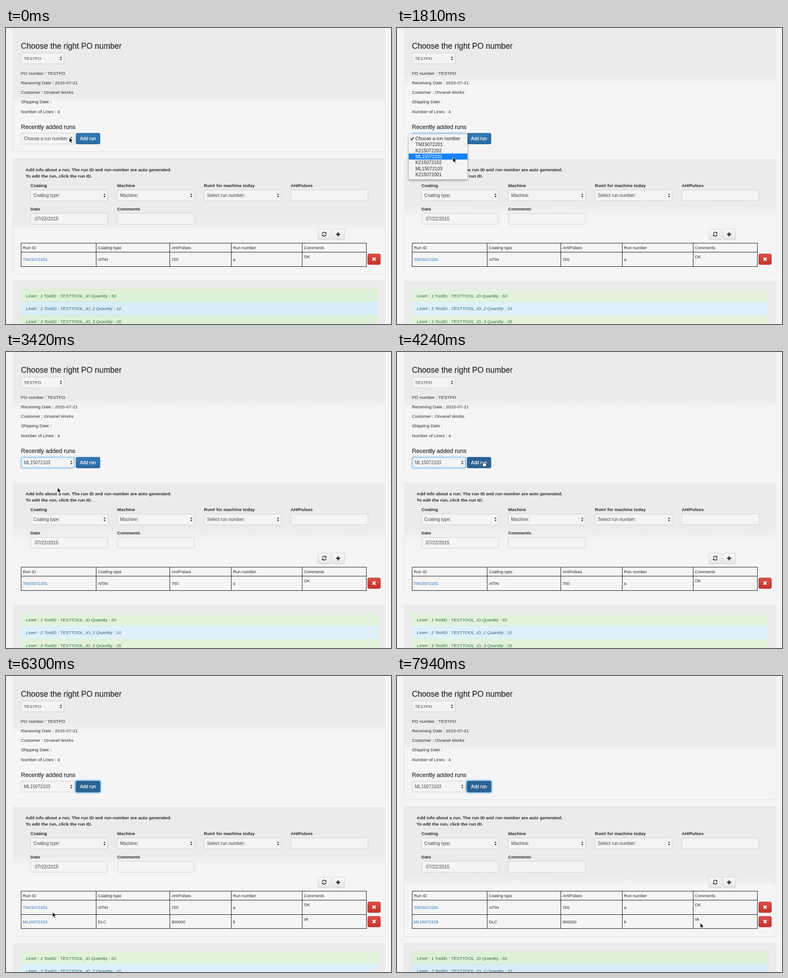
These frames come from a looping animation (852 by 657 pixels, 8000 ms). An HTML page:

```html
<!DOCTYPE html>
<html lang="en">
<head>
<meta charset="utf-8">
<title>Add run to order</title>
<style>
  html, body { margin: 0; width: 100%; height: 100%; overflow: hidden; background: #f5f5f5; }
  svg { display: block; width: 852px; height: 657px; font-family: "Liberation Sans", Arial, sans-serif; font-size: 9.9px; fill: #2a2a2a; }
  text { white-space: pre; }
  .head { fill: #333; stroke: #333; stroke-width: .3px; }
  .bold { font-weight: bold; }
  .cell { font-size: 9.3px; }
  .link { fill: #2a6fb5; }
  .field { fill: #f4f4f4; stroke: #cfcfcf; }
  .value { fill: #444; font-size: 10px; }
  .grid { fill: none; stroke: #111; }
  .focus { fill: none; stroke: #66afe9; filter: drop-shadow(0 0 2px #66afe9); }
  .menu { fill: #f3f3f3; filter: drop-shadow(0 2px 2.5px rgba(0,0,0,.4)); }
  .item { font-size: 10.25px; }
  .icon { fill: none; stroke: #222; }
  .line { font-size: 9.72px; }
  .it { font-style: italic; }
</style>
</head>
<body>
<script>
const LOOP = 8000, ROW = 32;

function add(parent, tag, attrs = {}, text) {
  const node = document.createElementNS("http://www.w3.org/2000/svg", tag);
  for (const k in attrs) node.setAttribute(k, attrs[k]);
  if (text !== undefined) node.textContent = text;
  parent.appendChild(node);
  return node;
}
const svg = add(document.body, "svg", { viewBox: "0 0 852 657" });
const defs = add(svg, "defs");
const group = (parent = svg) => add(parent, "g");
const box = (parent, x, y, w, h, attrs) => add(parent, "rect", { x, y, width: w, height: h, ...attrs });
const label = (parent, x, y, str, cls = "", attrs = {}) => add(parent, "text", { x, y, class: cls, ...attrs }, str);
const show = (node, on) => node.setAttribute("visibility", on ? "visible" : "hidden");

function gradient(id, top, bottom, attrs = {}) {
  const g = add(defs, "linearGradient", { id, x1: 0, y1: 0, x2: 0, y2: 1, ...attrs });
  add(g, "stop", { offset: 0, "stop-color": top });
  add(g, "stop", { offset: 1, "stop-color": bottom });
  return g;
}
const user = { gradientUnits: "userSpaceOnUse" };
const shades = [gradient("shade0", "#ebebeb", "#f5f5f5", user), gradient("shade1", "#ebebeb", "#f5f5f5", user)];
gradient("blue", "#337ab7", "#2b69a0");
gradient("red", "#da514d", "#c4322e");
gradient("grey", "#fcfcfc", "#e4e4e4");

const panel = (parent, y, h, fill) =>
  box(parent, 15.5, y, 823.5, h, { rx: 3, fill, stroke: "#e0e0e0" });

function select(x, y, w, value) {
  box(svg, x, y, w, 24, { rx: 2.5, class: "field" });
  const cx = x + w - 7, cy = y + 12;
  add(svg, "path", { d: `M${cx - 2.3} ${cy - 1.2}h4.6l-2.3 -3.4zM${cx - 2.3} ${cy + 1.2}h4.6l-2.3 3.4z`, fill: "#333" });
  return label(svg, x + 6, y + 15.6, value, "value");
}
const input = (x, y) => box(svg, x, y, 170.5, 24, { rx: 2.5, class: "field" });

// Order summary
const panels = [panel(svg, -8.5, 283, "url(#shade0)"), panel(svg, 290.5, 256, "url(#shade1)")];
label(svg, 33, 46, "Choose the right PO number", "head", { "font-size": 17.5 });
select(33.5, 55.5, 95, "TESTPO").style.fontSize = "9.6px";
["PO number : TESTPO", "Receiving Date : 2015-07-21", "Customer : Orvanel Works", "Shipping Date :", "Number of Lines : 4"]
  .forEach((s, i) => label(svg, 33, 104 + i * 21.15, s));
label(svg, 33, 224.4, "Recently added runs", "head", { "font-size": 13.15 });
const runValue = select(33.5, 233.5, 118, "Choose a run number");
const runFocus = box(svg, 33.5, 233.5, 118, 24, { rx: 2.5, class: "focus" });
const addFocus = box(svg, 154.5, 233, 54, 25, { rx: 3, class: "focus", "stroke-width": 2.5 });
const addButton = box(svg, 155, 233.5, 53, 24, { rx: 3, stroke: "#2b669a" });
label(svg, 163.8, 249.2, "Add run", "", { fill: "#fff", stroke: "#fff", "stroke-width": .25, "font-size": 10 });

// Run form
label(svg, 43.5, 317.6, "Add info about a run. The run ID and run number are auto generated.", "bold");
label(svg, 43.5, 331.6, "To edit the run, click the run ID.", "bold");
const cols = [54.5, 246.5, 438.5, 630.5];
["Coating", "Machine", "Run# for machine today", "AH/Pulses"].forEach((s, i) => label(svg, cols[i] - .5, 352.6, s, "bold"));
["Coating type:", "Machine:", "Select run number:"].forEach((s, i) => select(cols[i], 359.5, 170.5, s));
input(cols[3], 359.5);
["Date", "Comments"].forEach((s, i) => {
  label(svg, cols[i] - .5, 404.6, s, "bold");
  input(cols[i], 411.5);
});
label(svg, 64, 427.2, "07/22/2015", "value", { style: "font-size:10.4px" });

for (const x of [690, 721]) box(svg, x + .5, 446.5, 27.5, 23.5, { rx: 3, fill: "url(#grey)", stroke: "#ccc" });
add(svg, "path", { d: "M700 456.5a4.2 4.2 0 0 1 7.3 -2M708.4 458.5a4.2 4.2 0 0 1 -7.3 2", class: "icon", "stroke-width": 1.5 });
add(svg, "path", { d: "M708.9 452.4v4h-4zM699.5 462.6v-4h4z" });
add(svg, "path", { d: "M730.4 458h9.2M735 453.4v9.2", class: "icon", "stroke-width": 2.6 });

// Run table
const edges = [33.5, 199.5, 362.5, 498.5, 655.5, 797.5];
function tableRow(parent, y, h, cells, header) {
  cells.forEach((s, i) => {
    box(parent, edges[i], y, edges[i + 1] - edges[i], h, { class: "grid" });
    const base = header ? 13.2 : i === 4 ? 13.4 : 19;
    label(parent, edges[i] + 3.7, y + base, s, header || i ? "cell" : "cell link");
  });
  if (header) return;
  box(parent, 800.5, y + 4, 28, 23.5, { rx: 3, fill: "url(#red)", stroke: "#bb3430" });
  add(parent, "path", { d: `M811.2 ${y + 12.2}l6.6 6.6m0 -6.6l-6.6 6.6`, stroke: "#fff", "stroke-width": 2.5 });
}
tableRow(svg, 477.5, 20, ["Run ID", "Coating type", "AH/Pulses", "Run number", "Comments"], true);
tableRow(svg, 497.5, ROW, ["TM15072201", "AlTiN", "750", "a", "OK"]);
const newRow = group();
tableRow(newRow, 497.5 + ROW, ROW - 1, ["ML15072103", "DLC", "900000", "b", "ok"]);

// Order lines
const lines = group();
panels.push(panel(lines, 561.5, 140, "#ebebeb"));
const green = { fill: "#dff0d8", pale: "#e2f2dc", edge: "#d3e6c5", ink: "#33693a" };
const sky = { fill: "#d9edf7", pale: "#def0f9", edge: "#c6e4ee", ink: "#2b6080" };
const bars = [green, sky, green].map((tint, i) => {
  const y = 579.5 + i * 28.8;
  const rect = box(lines, 33.5, y, 788, 28.8, { "stroke-width": .7 });
  const row = label(lines, 44, y + 18, "", "line", { fill: tint.ink });
  const id = "TESTTOOL_ID" + (i ? "_" + (i + 1) : "");
  ["Line# : ", i + 1, " ToolID : ", id, " Quantity : ", [50, 10, 25][i]]
    .forEach((s, k) => add(row, "tspan", { class: i || k % 2 ? "it" : "" }, s));
  return { rect, tint };
});

// Open run menu
const menu = group();
const PITCH = 13.35, MENU_TOP = 238.6;
add(menu, "path", { d: "M26 236H156V333q0 3 -3 3H29q-3 0 -3 -3z", class: "menu" });
const mark = box(menu, 26, 0, 130, 13.4, { fill: "#1682fc" });
const items = ["Choose a run number", "TM15072201", "K215072202", "ML15072101", "K215072102", "ML15072103", "K215072001"]
  .map((s, i) => label(menu, 40.7, 249 + i * PITCH, s, "item"));
const tick = add(menu, "path", { d: "M30.3 245.8l2.3 3l4 -6.6", fill: "none", "stroke-width": 1.5 });

// Pointer
const arrow = add(svg, "path", {
  d: "M0 0V11.2L2.6 8.8L4.4 12.8L6.4 11.9L4.6 8H8.2Z", fill: "#000", stroke: "#fff", "stroke-width": .9 });
const hand = add(svg, "path", {
  d: "M3 7.5V1.6Q3 .6 4 .6T5 1.6V4.6Q7 4 7.4 5Q9 4.6 9.2 5.6Q10.8 5.4 10.8 7V9L9.8 12.4H4.4L1 8Q.4 6.8 1.4 6.4Z",
  fill: "#fff", stroke: "#000", "stroke-width": .9 });

// [start, end, steps, x, y, curved]
const moves = [
  [1040, 1040, 1, 139, 243],
  [1340, 1890, 10, 123, 298, 1],
  [2100, 2360, 5, 117, 310],
  [3120, 3120, 1, 115, 306],
  [3330, 3400, 2, 114, 301],
  [3460, 4130, 12, 184, 242],
  [4180, 4240, 2, 187, 242],
  [5370, 5370, 1, 183, 244],
  [5510, 5800, 6, 116, 487, 1],
  [6070, 6300, 5, 103, 524],
  [6360, 6580, 5, 120, 542],
  [7030, 7820, 13, 657, 549],
  [7880, 7940, 2, 671, 548]
];
function pointer(t) {
  let x = 140, y = 243;
  for (const [t0, t1, n, tx, ty, curved] of moves) {
    if (t < t0) break;
    const gap = n > 1 ? (t1 - t0) / (n - 1) : 1;
    const p = Math.min(n, Math.floor((t - t0) / gap + .1) + 1) / n;
    x += (tx - x) * (curved ? 1 - (1 - p) ** 2 : p);
    y += (ty - y) * p;
  }
  return [x, y];
}
const within = (t, a, b) => t >= a && t < b;

function draw(t) {
  const [x, y] = pointer(t);
  const open = within(t, 570, 2860), picked = t >= 2860, added = t >= 4830, pressed = t >= 4680;
  const light = within(t, 1340, 1890) || within(t, 2770, 6760);
  const over = !open && x > 154 && x < 208 && y < 257;

  const second = light ? (added ? [400, 422] : [393, 420]) : (added ? [446, 468] : [429, 450]);
  [light ? [104, 126] : [148, 168], second].forEach(([a, b], i) => {
    shades[i].setAttribute("y1", a);
    shades[i].setAttribute("y2", b);
  });
  for (const p of panels) p.setAttribute("stroke", light ? "#ebebeb" : "#e0e0e0");
  for (const { rect, tint } of bars) {
    rect.setAttribute("fill", light ? tint.pale : tint.fill);
    rect.setAttribute("stroke", light ? tint.pale : tint.edge);
  }
  panels[1].setAttribute("height", added ? 256 + ROW : 256);
  lines.setAttribute("transform", `translate(0 ${added ? ROW : 0})`);
  show(newRow, added);

  runValue.textContent = picked ? "ML15072103" : "Choose a run number";
  show(runFocus, within(t, 810, 4680));
  show(addFocus, pressed);
  addButton.setAttribute("fill", over || pressed ? "#2a6294" : "url(#blue)");

  menu.style.display = open ? "" : "none";
  if (open) {
    const blink = within(t, 2600, 2770);
    // The first item stays lit until the pointer is well under way
    const row = blink ? -1 : t < 1500 ? 0 : Math.floor((y - MENU_TOP) / PITCH);
    mark.setAttribute("y", MENU_TOP + row * PITCH);
    show(mark, !blink);
    items.forEach((item, i) => item.setAttribute("fill", i === row ? "#fff" : "#222"));
    tick.setAttribute("stroke", row === 0 ? "#fff" : "#222");
  }

  show(arrow, !over);
  show(hand, over);
  for (const c of [arrow, hand]) c.setAttribute("transform", `translate(${x} ${y})`);
}

const begin = performance.now();
function frame() {
  draw((performance.now() - begin) % LOOP);
  requestAnimationFrame(frame);
}
frame();
</script>
</body>
</html>
```
